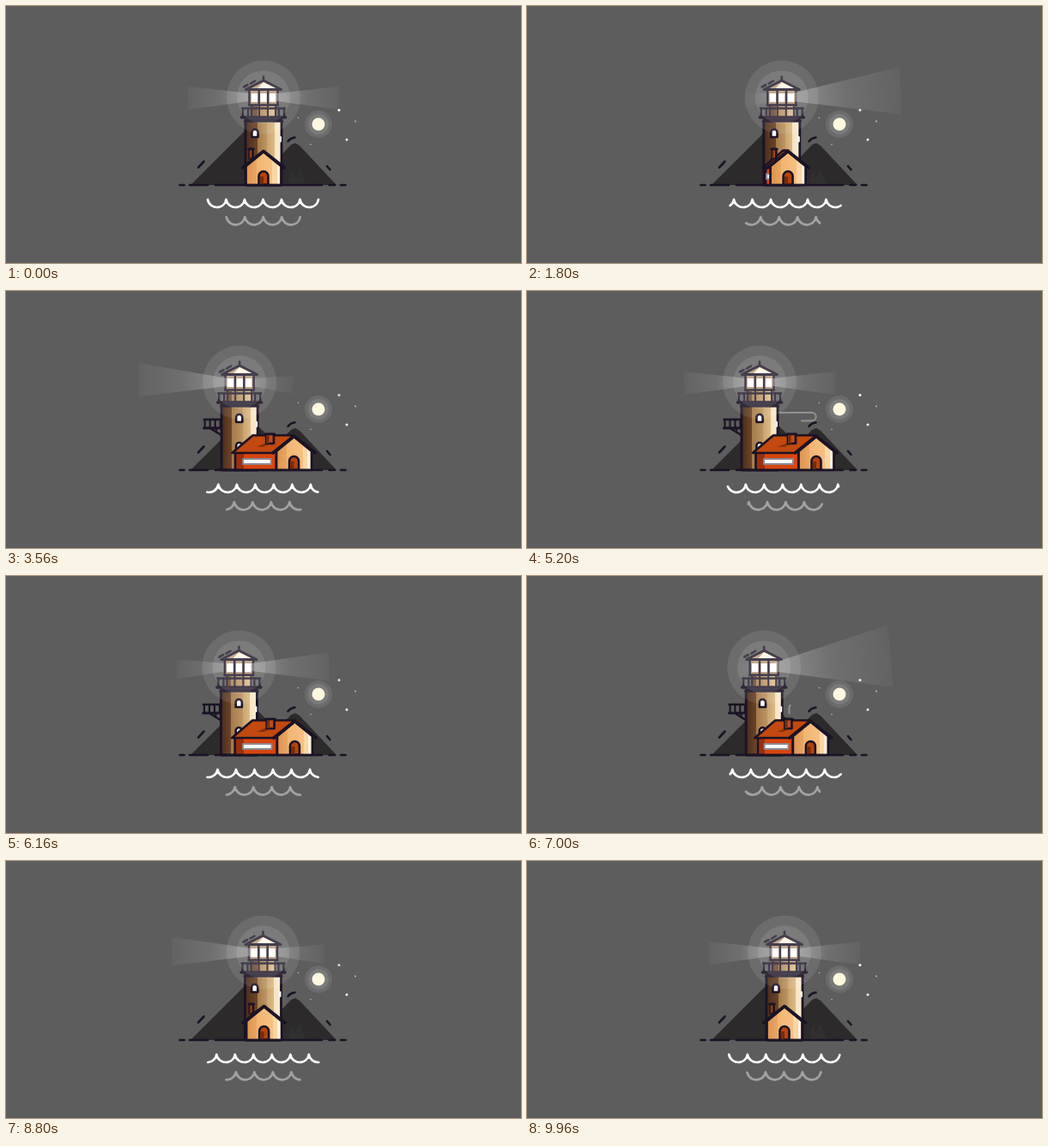
These frames come from a looping animation (600 px wide and 300 px high, 10 s). An HTML page with a canvas:

```html
<!DOCTYPE html>
<html>
<head>
<meta charset="utf-8">
<title>Lighthouse</title>
<style>
html, body { margin: 0; width: 100%; height: 100%; overflow: hidden; background: #5d5d5d; }
canvas { display: block; width: 600px; height: 300px; }
</style>
</head>
<body>
<canvas id="stage" width="600" height="300"></canvas>
<script>
const ctx = document.getElementById('stage').getContext('2d');
const INK = '#1b1325';
const LOOP = 10000;

const lerp = (a, b, k) => a + (b - a) * k;
const clamp = v => Math.min(1, Math.max(0, v));
const white = alpha => `rgba(255,255,255,${alpha})`;

// Symmetric ease in and out with a chosen power
function ease(u, power) {
  return u < .5 ? .5 * (2 * u) ** power : 1 - .5 * (2 - 2 * u) ** power;
}

function paint(fill, stroke, width = 2.7) {
  if (fill) { ctx.fillStyle = fill; ctx.fill(); }
  if (stroke) { ctx.strokeStyle = stroke; ctx.lineWidth = width; ctx.stroke(); }
}

function poly(points, fill, stroke, width, closed = true) {
  ctx.beginPath();
  points.forEach(([x, y]) => ctx.lineTo(x, y));
  if (closed) ctx.closePath();
  paint(fill, stroke, width);
}

const line = (x1, y1, x2, y2, width = 2.6, color = INK) =>
  poly([[x1, y1], [x2, y2]], null, color, width, false);

function rect(x, y, w, h, fill, stroke, width) {
  ctx.beginPath();
  ctx.rect(x, y, w, h);
  paint(fill, stroke, width);
}

function disc(x, y, r, fill) {
  ctx.beginPath();
  ctx.arc(x, y, r, 0, 7);
  paint(fill);
}

function arch(x, top, bottom, r, fill, width) {
  ctx.beginPath();
  ctx.moveTo(x - r, bottom);
  ctx.arc(x, top + r, r, Math.PI, 0);
  ctx.lineTo(x + r, bottom);
  ctx.closePath();
  paint(fill, INK, width);
}

// Hard-edged or smooth horizontal shading from [offset, color] stops
function shading(x1, x2, stops) {
  const gradient = ctx.createLinearGradient(x1, 0, x2, 0);
  stops.forEach(([at, color]) => gradient.addColorStop(at, color));
  return gradient;
}

function drawSky(t) {
  const pulse = Math.cos(t / 2500 * 2 * Math.PI);
  [[16, .09], [12, .1]].forEach(([r, a]) => disc(364, 138, r, white(a)));
  disc(364, 138, 7.5, '#fff8e0');
  disc(388, 121.5, 1.5, white(.88 + .12 * pulse));
  disc(397, 156, 1.5, white(.92));
  disc(407, 134.5, .9, white(.65));
  disc(340.5, 130.5, .8, white(.6));
  disc(355, 161.5, .8, white(.6));
}

function drawMountains() {
  poly([[215, 209], [278, 146], [285, 149], [345, 209]], '#2c2a2b');
  poly([[288, 209], [332, 162], [337, 160], [342, 163], [385, 209]], '#2c2a2b');
  poly([[328, 209], [333, 192], [336, 200], [343, 190], [349, 209]], '#313031');
  line(224, 188.5, 230.5, 181.5);
  line(374, 187, 377.5, 191);
  ctx.beginPath();
  ctx.moveTo(328.5, 158);
  ctx.quadraticCurveTo(331.5, 154, 336.5, 153.5);
  paint(null, INK, 2.6);
}

function drawGround() {
  line(202.5, 209, 207.5, 209);
  line(214, 209, 235, 209);
  line(244, 209, 368, 209);
  line(376.5, 209, 383, 209);
  line(390, 209, 395.5, 209);
}

// A run of scallops, visible from `from` to `to` counted in arcs
function drawWave(x, y, from, to, color) {
  const tilt = .17, span = Math.PI - 2 * tilt;
  const angle = f => Math.PI - tilt - f * span;
  ctx.beginPath();
  for (let i = Math.floor(from); i < to; i++) {
    const a = clamp(from - i), b = clamp(to - i);
    ctx.arc(x + (i + .5) * 21.5, y, 10.9, angle(a), angle(b), true);
  }
  paint(null, color, 2.7);
}

function drawSea(t) {
  const s = t / 2500 % 1;
  drawWave(235 - s * 21.5, 224.1, s, s + 6, '#fff');
  drawWave(235.2 + s * 21.5, 244.5, 1 - s, 5 - s, '#a2a2a2');
}

function drawBalcony(c, p) {
  const reach = 24 * Math.sin(p * Math.PI / 2);
  if (reach < 2) return;
  const left = c - 17.5 - reach, right = c - 20;
  line(left, 150, right, 150);
  line(left, 160, right, 160, 3.2);
  for (let i = 0; i < 4; i++) line(left + 1 + i * reach / 4, 150, left + 1 + i * reach / 4, 160, 2.1);
  line(left + reach * .35, 161, right, 169);
  line(left + reach * .6, 161, left + reach * .6, 165, 2);
}

function drawTower(c, p) {
  const split = lerp(.34, .28, p);
  const shade = shading(c - 21, c + 21, [
    [0, '#4a2c1c'], [split, '#6b4528'], [split, '#a37a4a'], [.6, '#bd9562'],
    [.6, '#c9a470'], [.8, '#dcb985'], [.8, '#f5e2c0'], [1, '#fbeed6']]);

  rect(c - 21, 133, 42, 76, shade, INK, 2.8);
  line(c + 20, 153, c + 20, 158, 2, '#fff');
  const windowX = c - 10 * (1 - p);
  arch(windowX, 144, 153, 3.6, '#fff', 2.6);
  arch(windowX, 177, 186, 3.6, '#fff', 2.6);

  // Gallery
  rect(c - 15, 117, 30, 14, shade);
  [-24, -18, 18, 24].forEach(x => line(c + x, 119.5, c + x, 129, 2.3));
  [-14, -5, 5, 14].forEach(x => line(c + x, 117, c + x, 129, 2.1));
  line(c - 25, 119.5, c + 25, 119.5, 2.4);
  line(c - 25.5, 130, c + 25.5, 130, 3.6);
  line(c - 22, 134.5, c + 22, 134.5, 2.4);

  // Lantern and roof
  rect(c - 17, 98, 34, 18, '#b39475');
  [-14.2, -3.8, 6.6].forEach(x => rect(c + x, 102, 7.6, 10, '#fff'));
  [-16.5, -5.2, 5.2, 16.5].forEach(x => line(c + x, 98, c + x, 116, 2.5));
  line(c - 17, 115.5, c + 17, 115.5, 2.3);
  const roof = [[c - 20.5, 97.5], [c, 87], [c + 20.5, 97.5]];
  poly(roof, '#b89a78');
  poly([[c - 7, 96], [c, 89], [c + 15, 96]], '#fff5e2');
  poly(roof, null, INK, 3);
  line(c, 82.5, c, 87);
  line(c - 23, 94.5, c - 18.5, 92);
  line(c - 15, 90.5, c - 10, 87.5);
}

function drawHouse(a, p) {
  const depth = 50 * p, half = 20.5, wall = a - half;
  if (depth > 1) {
    const side = shading(wall - depth, wall,
      [[0, '#9c2f0c'], [.2, '#9c2f0c'], [.2, '#d8450f'], [1, '#d8450f']]);
    rect(wall - depth, 188, depth, 21, side, INK);
    rect(wall - depth * .81, 196, depth * .68, 6, '#fff', '#8d8791', 2);
    poly([[a, 168.5], [a - depth, 168.5], [a - 24 - depth, 189], [a - 24, 189]], '#c2490f', INK);
    poly([[a - depth * .62, 176], [a - depth * .46, 176], [a - 12 - depth * .5, 182], [a - 12 - depth * .66, 182]], '#84300b');
  }
  const chimney = lerp(283.5, 304, p), width = lerp(4, 9, p);
  rect(chimney, 167, width, 11, '#bd4e1c', INK);
  rect(chimney, 167, width * .4, 11, '#74300f');
  line(chimney - 1, 167, chimney + width + 1, 167);

  const gable = [[wall, 209], [wall, 187], [a, 170], [a + half, 187], [a + half, 209]];
  const front = shading(wall, a + half, [
    [0, '#dc9450'], [.3, '#e9a562'], [.3, '#f2b572'], [.75, '#f6c083'],
    [.75, '#fbd5a4'], [.88, '#fbd5a4'], [.88, '#fff0dc'], [1, '#fff0dc']]);
  poly(gable, front, INK);
  poly([[a - 24.5, 189], [a, 169.5], [a + 24.5, 189]], null, INK, 3.6, false);
  arch(a, 193, 208.5, 5.5, '#b5430f', 2.6);
  rect(a - 4.3, 199, 4.3, 9, '#752c0d');
}

// One beam of the lamp, turned by `phi`, seen in perspective
function drawBeam(c, phi) {
  const z = 88 * Math.sin(phi), scale = 110 / (110 - z);
  const dir = Math.cos(phi), sign = dir < 0 ? -1 : 1;
  const x = c + 88 * dir * scale, y = 107.5 - .075 * z * scale;
  const half = 13.5 * scale;
  const bulge = z > 0 ? half * clamp((Math.sin(phi) - .78) * 7) : 0;
  const start = c + 15 * dir;
  // The far end stands square to the axis of the beam
  const tilt = Math.atan2(sign * (y - 106), Math.abs(x - start) + bulge);
  const dx = half * Math.sin(tilt), dy = half * Math.cos(tilt);
  const glow = ctx.createLinearGradient(start, 106, x + sign * bulge, y - .1);
  glow.addColorStop(0, white(.32));
  glow.addColorStop(.5, white(.115));
  glow.addColorStop(1, white(.035));
  ctx.globalAlpha = z < 0 ? clamp(1.15 + z / 75) : 1;
  ctx.beginPath();
  ctx.moveTo(start, 102);
  ctx.lineTo(x + dx, y - dy);
  ctx.lineTo(x - dx, y + dy);
  ctx.lineTo(start, 111);
  ctx.closePath();
  if (bulge > 0) {
    ctx.moveTo(x + bulge * Math.cos(tilt), y + bulge * Math.sin(tilt));
    ctx.ellipse(x, y, bulge, half, tilt, 0, 2 * Math.PI, sign < 0);
  }
  paint(glow);
  ctx.globalAlpha = 1;
}

function drawGlow(c) {
  disc(c, 106.5, 43, white(.09));
  disc(c, 106.5, 31, white(.1));
}

// A stroke that grows from its start, then leaves from there
function drawCurl(x, y, k, length, trace) {
  if (k <= 0 || k >= 1) return;
  const head = length * clamp(k * 2), tail = length * clamp(k * 2 - 1);
  ctx.save();
  ctx.translate(x, y);
  ctx.setLineDash([head - tail, length * 3]);
  ctx.lineDashOffset = -tail;
  ctx.beginPath();
  trace();
  paint(null, white(.33), 2);
  ctx.restore();
}

function drawWind(t) {
  drawCurl(293, 142, (t - 4400) / 1600, 68, () => {
    ctx.moveTo(0, 0);
    ctx.lineTo(39, 0);
    ctx.arc(39, 4.7, 4.7, -Math.PI / 2, Math.PI / 2);
    ctx.lineTo(27, 9.4);
  });
}

function drawSmoke(t, p) {
  drawCurl(lerp(285, 310, p), 160.5, (t - 6800) / 2000, 50, () => {
    ctx.moveTo(0, 0);
    ctx.lineTo(0, -7);
    ctx.quadraticCurveTo(0, -10, 3, -10);
    ctx.lineTo(22, -10);
    ctx.arc(22, -14.3, 4.3, Math.PI / 2, -Math.PI * .8, true);
  });
}

function draw(t) {
  const u = t % 5000 / 5000;
  const turn = ease(u, 4.6);
  const p = t < 5000 ? turn : 1 - turn;
  const phi = Math.PI * ease(u, 2.5);
  const c = 300 - 29 * p;

  ctx.fillStyle = '#5d5d5d';
  ctx.fillRect(0, 0, 600, 300);
  drawSky(t);
  drawMountains();
  drawWind(t);
  drawBeam(c, phi + Math.PI);
  drawBalcony(c, p);
  drawTower(c, p);
  drawGlow(c);
  drawHouse(lerp(300, 337, p), p);
  drawSmoke(t, p);
  drawBeam(c, phi);
  drawGround();
  drawSea(t);
}

ctx.lineCap = ctx.lineJoin = 'round';
const begin = performance.now();
function frame() {
  draw((performance.now() - begin) % LOOP);
  requestAnimationFrame(frame);
}
frame();
</script>
</body>
</html>
```
